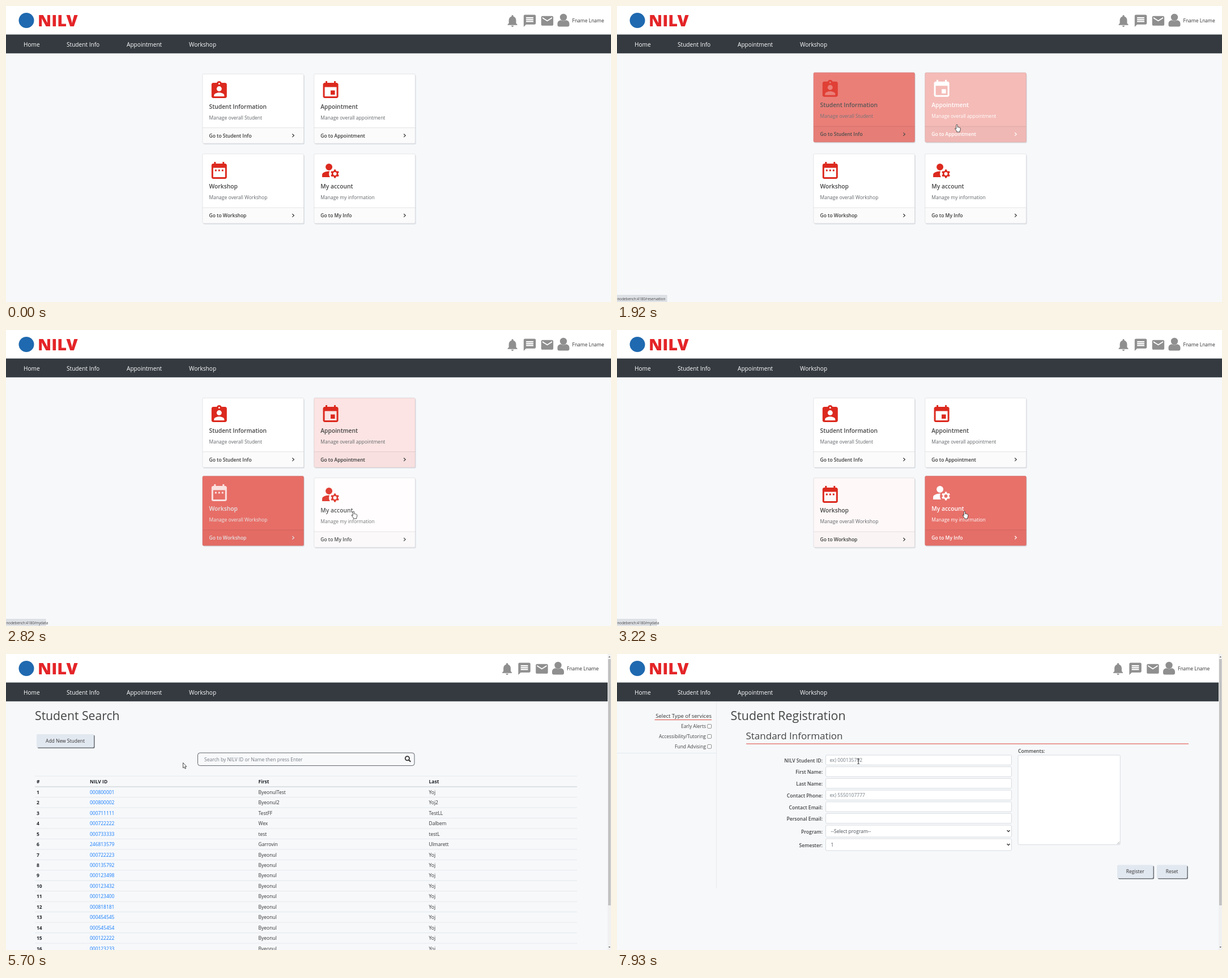
Recreate the animation shown at these times as an HTML page. Size 1068 by 524 pixels, loop 8 s.

```html
<!DOCTYPE html>
<html lang="en">
<head>
<meta charset="utf-8">
<title>Student portal</title>
<style>
html, body { margin: 0; width: 100%; height: 100%; overflow: hidden; background: #f6f8fa; }
svg { display: block; width: 100%; height: 100%; font-family: "Open Sans", "Noto Sans", sans-serif; }
</style>
</head>
<body>
<svg id="stage" viewBox="0 0 1068 524"></svg>
<script>
const LOOP = 8000, HOST = 'nodebench:4180/', WAIT = 'Waiting for data.quellumbsware.test...';
const RED = [220, 41, 30], WHITE = [255, 255, 255];

const ICON = {
  bell: 'M12 22c1.1 0 2-.9 2-2h-4c0 1.1.89 2 2 2zm6-6v-5c0-3.07-1.64-5.64-4.5-6.32V4c0-.83-.67-1.5-1.5-1.5s-1.5.67-1.5 1.5v.68C7.63 5.36 6 7.92 6 11v5l-2 2v1h16v-1l-2-2z',
  chat: 'M20 2H4c-1.1 0-2 .9-2 2v18l4-4h14c1.1 0 2-.9 2-2V4c0-1.1-.9-2-2-2zm-2 12H6v-2h12v2zm0-3H6V9h12v2zm0-3H6V6h12v2z',
  mail: 'M20 4H4c-1.1 0-2 .9-2 2v12c0 1.1.9 2 2 2h16c1.1 0 2-.9 2-2V6c0-1.1-.9-2-2-2zm0 4l-8 5-8-5V6l8 5 8-5v2z',
  badge: 'M19 3h-4.18C14.4 1.84 13.3 1 12 1s-2.4.84-2.82 2H5c-1.1 0-2 .9-2 2v14c0 1.1.9 2 2 2h14c1.1 0 2-.9 2-2V5c0-1.1-.9-2-2-2zm-7 0a1 1 0 0 1 0 2 1 1 0 0 1 0-2zm0 4a3 3 0 0 1 0 6 3 3 0 0 1 0-6zm6 12H6v-1.4c0-2 4-3.1 6-3.1s6 1.1 6 3.1V19z',
  event: 'M17 12h-5v5h5v-5zM16 1v2H8V1H6v2H5c-1.1 0-2 .9-2 2v14c0 1.1.9 2 2 2h14c1.1 0 2-.9 2-2V5c0-1.1-.9-2-2-2h-1V1h-2zm3 18H5V8h14v11z',
  dates: 'M9 11H7v2h2v-2zm4 0h-2v2h2v-2zm4 0h-2v2h2v-2zm2-7h-1V2h-2v2H8V2H6v2H5c-1.1 0-2 .9-2 2v14c0 1.1.9 2 2 2h14c1.1 0 2-.9 2-2V6c0-1.1-.9-2-2-2zm0 16H5V9h14v11z',
  account: 'M10 4a4 4 0 0 1 0 8 4 4 0 0 1 0-8zM10.67 13.02C10.45 13.01 10.23 13 10 13c-2.42 0-4.68.67-6.61 1.82C2.51 15.34 2 16.32 2 17.35V20h9.26C10.47 18.87 10 17.49 10 16c0-1.07.25-2.07.67-2.98zM20.75 16c0-.22-.03-.42-.06-.63l1.14-1.01-1-1.73-1.45.49c-.32-.27-.68-.48-1.08-.63L18 11h-2l-.3 1.49c-.4.15-.76.36-1.08.63l-1.45-.49-1 1.73 1.14 1.01c-.03.21-.06.41-.06.63s.03.42.06.63l-1.14 1.01 1 1.73 1.45-.49c.32.27.68.48 1.08.63L16 21h2l.3-1.49c.4-.15.76-.36 1.08-.63l1.45.49 1-1.73-1.14-1.01c.03-.21.06-.41.06-.63zM17 18a2 2 0 0 1 0-4 2 2 0 0 1 0 4z'
};

// Markup helpers
const text = (x, y, s, size = 8.5, fill = '#333', weight = 400, anchor = 'start') =>
  `<text x="${x}" y="${y}" font-size="${size}" fill="${fill}" font-weight="${weight}" text-anchor="${anchor}">${s}</text>`;
const rect = (x, y, w, h, fill, extra = '') =>
  `<rect x="${x}" y="${y}" width="${w}" height="${h}" fill="${fill}" ${extra}/>`;
const path = (d, extra = '') => `<path d="${d}" ${extra}/>`;
const line = (x1, y1, x2, y2, color, w = .7) =>
  `<line x1="${x1}" y1="${y1}" x2="${x2}" y2="${y2}" stroke="${color}" stroke-width="${w}"/>`;
const icon = (name, x, y, scale, extra = '') =>
  path(ICON[name], `transform="translate(${x} ${y}) scale(${scale})" fill-rule="evenodd" ${extra}`);
const group = (id, body) => `<g id="${id}">${body}</g>`;
const button = (id, x, y, w, h, label) => group(id,
  rect(x + 1.6, y + 1.6, w, h, '#6d7278', 'rx="2"') + rect(x, y, w, h, '#e2e8f0', 'rx="2"') +
  text(x + w / 2, y + h / 2 + 3, label, 8.5, '#333', 400, 'middle'));
const chevron = (x, y, extra = '') =>
  path(`M${x - 1.6} ${y - 2.8}l3 2.8-3 2.8`, `fill="none" stroke-width="1.2" ${extra}`);

const header = () => rect(0, 0, 1068, 50.5, '#fff') +
  '<circle cx="36" cy="25.5" r="13.5" fill="#1f69b0"/>' + text(56, 36, 'NILV', 29, '#e42528', 800) +
  group('tools', `<g fill="#8f8f8f">${icon('bell', 881.2, 13.4, 1.07)}${icon('chat', 911.7, 13.4, 1.07)}` +
    icon('mail', 942.6, 13.4, 1.07) + '<circle cx="984" cy="20" r="6.2"/>' +
    path('M973.5 33.5v-2c0-4 3-6.2 6-6.2q4.500 2.200 9 0c3 0 6 2.200 6 6.200v2q0 3-3 3h-15q-3 0-3-3z') + '</g>' +
    text(999.5, 28.7, 'Fname Lname')) +
  rect(0, 50.5, 1068, 33.3, '#343a40') +
  [[31, 'Home'], [107, 'Student Info'], [213, 'Appointment'], [323, 'Workshop']]
    .map(([x, s]) => text(x, 71.6, s, 10.15, '#fff')).join('');

const CARDS = [
  ['badge', 'Student Information', 'Manage overall Student', 'Go to Student Info'],
  ['event', 'Appointment', 'Manage overall appointment', 'Go to Appointment'],
  ['dates', 'Workshop', 'Manage overall Workshop', 'Go to Workshop'],
  ['account', 'My account', 'Manage my information', 'Go to My Info']
];
const card = ([name, title, note, link], i) => group('card' + i,
  rect(1.3, 1.6, 178.6, 123.2, '#dcdfe4', 'rx="2"') +
  rect(0, 0, 178.5, 123, '#fff', 'class="face" rx="2" stroke="#dcdcdf" stroke-width=".7"') +
  rect(.3, 95.2, 178, 27.5, '#000', 'opacity=".015"') + line(0, 95.2, 178.5, 95.2, 'rgba(0,0,0,.14)') +
  icon(name, 11.3, 11.3, 1.5, 'class="icon"') +
  text(11.5, 61.4, title, 10.3, '#444', 600) + text(11.5, 80.4, note, 8.5, '#606468') +
  text(11.5, 112.3, link, 8.5, '#383838', 600) + chevron(160, 109, 'class="chev"'));

const ROWS = ['000800001 ByeonulTest Yoj', '000800002 Byeonul2 Yoj2', '000711111 TestFF TestLL',
  '000722222 Wex Dalbem', '000733333 test testL', '246813579 Garrovin Ulmarett',
  ...['000722223', '000135792', '000123498', '000123432', '000123400', '000818181',
    '000454545', '000545454', '000122222', '000123233'].map(id => id + ' Byeonul Yoj')];
const row = (s, i) => {
  const [id, first, last] = s.split(' '), y = 247.7 + i * 18.47;
  return text(54, y, i + 1, 8.5, '#212529', 700) + text(148, y, id, 8.45, '#147bfc') +
    text(445.5, y, first) + text(746.5, y, last) + line(51, y + 5.8, 1008, y + 5.8, '#dee2e6');
};
const search = () => text(51, 117, 'Student Search', 21.2, '#444', 500) +
  button('add', 54, 142, 101, 23.5, 'Add New Student') +
  group('find', rect(338.5, 175, 382.5, 22.6, '#f8f9fb', 'rx="4" stroke="#50555b" stroke-width=".9"') +
    text(350, 189.6, 'Search by NILV ID or Name then press Enter', 8.5, '#757b82') +
    '<circle cx="708.400" cy="184.800" r="3.600" fill="none" stroke="#333" stroke-width="1.800"/>' +
    line(711, 187.5, 714.3, 190.8, '#333', 2)) +
  group('table', line(51, 216.2, 1008, 216.2, '#dee2e6') + line(51, 235, 1008, 235, '#d5dade', 1.3) +
    text(54, 228.8, '#', 8.5, '#212529', 700) + text(148, 228.8, 'NILV ID', 8.5, '#212529', 700) +
    text(445.5, 228.8, 'First', 8.5, '#212529', 700) + text(746.5, 228.8, 'Last', 8.5, '#212529', 700) +
    ROWS.map(row).join(''));

const field = ([label, y, h, value, select]) =>
  text(363, y + h / 2 + 4.1, label, 8.6, '#444', 600, 'end') +
  rect(368.5, y, 328, h, '#fff', 'rx="2" stroke="#ced4da" stroke-width=".8"') +
  text(select ? 377.5 : 375.5, y + h / 2 + 3, value, 8.5, select ? '#495057' : '#757d85') +
  (select ? path(`M688.500 ${y + h / 2 - 1.5}l2.500 2.500 2.500-2.500`, 'fill="none" stroke="#333" stroke-width="1.300"') : '');
const FIELDS = [
  ['NILV Student ID:', 179, 17.4, 'ex) 000135792'], ['First Name:', 199.6, 17.4, ''],
  ['Last Name:', 220.3, 17.4, ''], ['Contact Phone:', 241, 17.4, 'ex) 5550107777'],
  ['Contact Email:', 261.7, 17.4, ''], ['Personal Email:', 282.3, 17.4, ''],
  ['Program:', 303, 21, '--Select program--', 1], ['Semester:', 327, 21, '1', 1]
];
const form = () => text(167, 113, 'Select Type of services', 9.5, '#333', 500, 'end') +
  line(66.5, 116.5, 167, 116.5, '#e0463c', 1) +
  ['Early Alerts', 'Accessibility/Tutoring', 'Fund Advising'].map((s, i) =>
    text(157, 131.2 + i * 17.9, s, 8.45, '#444', 400, 'end') +
    rect(159.8, 124.6 + i * 17.9, 6.8, 6.8, '#fff', 'rx="1" stroke="#707070" stroke-width=".8"')).join('') +
  line(0, 175.5, 175.5, 175.5, '#e1e4e8') + line(175.5, 84, 175.5, 415, '#e1e4e8') +
  text(200.5, 117, 'Student Registration', 21.4, '#444', 500) +
  text(227.5, 150.8, 'Standard Information', 17, '#444', 500) + line(228, 159, 1009, 159, '#e0463c', 1.1) +
  FIELDS.map(field).join('') + text(708, 175, 'Comments:', 8.6, '#444', 600) +
  rect(708, 179, 180.3, 158.6, '#fff', 'rx="2" stroke="#ced4da" stroke-width=".8"') +
  path('M883 336.500l4-4M885.500 336.500l1.500-1.500', 'stroke="#777" stroke-width=".700"') +
  button('register', 883, 373.5, 63.5, 23.5, 'Register') + button('reset', 953, 373.5, 53.3, 23.5, 'Reset');

const scrollbar = () => rect(1062, 0, 6, 524, '#f1f1f1') + rect(1063, 9, 4.6, 436, '#c1c1c1') +
  path('M1063.500 6h3.400l-1.700-2zM1063.500 518h3.400l-1.700 2z', 'fill="#505050"');

const pointers = () =>
  path('M0 0v9.300l2.100-1.900 1.400 3.200 1.500-.6-1.400-3.200h2.700z',
    'id="arrow" fill="#fff" stroke="#222" stroke-width=".8"') +
  path('M0 0q1.200 0 1.200 1.200v3.300q1.300-.6 1.900.3 1.200-.4 1.700.5 1.400-.1 1.400 1.300v2q0 1.600-1 2.800v1.600h-5.400v-1.400l-3-3.900q-.6-1.300.6-1.400l1.400 1.300v-6.400q0-1.200 1.200-1.200z',
    'id="hand" fill="#fff" stroke="#222" stroke-width=".8"') +
  path('M-1.800-4.500q1.800 0 1.800 1 0-1 1.800-1M0-4v8M-1.800 4.500q1.800 0 1.800-1 0 1 1.800 1',
    'id="beam" fill="none" stroke="#222" stroke-width=".9"');

const stage = document.getElementById('stage');
stage.innerHTML = rect(0, 0, 1068, 524, '#f6f8fa') + header() +
  group('home', CARDS.map(card).join('')) + group('search', search()) + group('form', form()) +
  group('scroll', scrollbar()) +
  group('status', rect(-1, 512, 0, 13, '#dee1e6', 'stroke="#c9ccd1" stroke-width=".6"') + text(.5, 520.6, '', 6.3, '#444')) +
  group('pointer', pointers());
const $ = id => document.getElementById(id);
const show = (id, on) => $(id).setAttribute('display', on ? 'inline' : 'none');

// Timeline: hover = [card, enter, leave]; status = [time, text, width]; pointer = [time, x, y, shape]
const HOVERS = [[3, 560, 680], [2, 790, 890], [0, 900, 1800], [1, 1685, 2455], [2, 2360, 2785], [3, 2790, 4105], [0, 4008, 9000]];
const STATUS = [[0, ''], [920, HOST + 'studentinfo', 84], [1820, HOST + 'reservation', 88], [2420, HOST + 'workshop', 80],
  [2820, HOST + 'mydata', 70], [4120, HOST + 'studentinfo', 84], [4220, WAIT, 355], [4560, ''],
  [6430, HOST + 'addstudent', 86], [6630, WAIT, 385], [7830, '']];
const POINTER = [[20, 1038, 508, 'arrow'], [520, 668, 345, 'hand'], [820, 446, 248, 'hand'], [920, 430, 222, 'hand'],
  [1620, 505, 204, 'hand'], [1920, 600, 210, 'hand'], [2320, 570, 228, 'hand'], [2420, 490, 292, 'hand'],
  [2720, 510, 322, 'hand'], [2820, 613.5, 321, 'hand'], [3920, 613.5, 321, 'hand'], [4120, 440.5, 193, 'hand'],
  [4420, 440.5, 193, 'arrow'], [5180, 350, 202, 'arrow'], [5630, 312.5, 192.5, 'arrow'], [5980, 184, 215, 'arrow'],
  [6380, 107, 153, 'hand'], [6830, 107, 153, 'hand'], [6930, 107, 153, 'arrow'], [7730, 395, 186, 'beam'], [7930, 426.2, 190, 'beam']];

const ease = v => { v = Math.min(1, Math.max(0, v)); return v * v * (3 - 2 * v); };
const mix = (a, b, p) => `rgb(${a.map((v, i) => Math.round(v + (b[i] - v) * p))})`;
const last = (list, t) => list.filter(k => k[0] <= t).pop();
const hover = (i, t, dur) => HOVERS.reduce((v, [c, on, off]) =>
  c === i ? Math.max(v, ease((t - on) / dur) * (1 - ease((t - off) / dur))) : v, 0);

const parts = CARDS.map((_, i) => ({
  root: $('card' + i), face: $('card' + i).querySelector('.face'),
  icon: $('card' + i).querySelector('.icon'), chev: $('card' + i).querySelector('.chev'),
  texts: [...$('card' + i).querySelectorAll('text')]
}));
const INK = [[68, 68, 68], [96, 100, 104], [56, 56, 56]];

function drawCards(t) {
  parts.forEach((p, i) => {
    const glow = hover(i, t, 500) * .7, ink = hover(i, t, 150), lift = hover(i, t, 370) * 3.2;
    p.root.setAttribute('transform', `translate(${i % 2 ? 543.8 : 347} ${(i > 1 ? 261.8 : 120.3) - lift})`);
    p.face.setAttribute('fill', mix(WHITE, RED, glow));
    p.face.setAttribute('stroke', mix([220, 220, 223], [200, 70, 62], glow));
    p.icon.setAttribute('fill', mix(RED, WHITE, ink));
    p.chev.setAttribute('stroke', mix(INK[2], WHITE, ink));
    p.texts.forEach((el, k) => el.setAttribute('fill', mix(INK[k], WHITE, ink)));
  });
}

function drawPointer(t) {
  const a = last(POINTER, t);
  show('pointer', a);
  if (!a) return;
  const b = POINTER[POINTER.indexOf(a) + 1] || a;
  const p = b === a ? 0 : (t - a[0]) / (b[0] - a[0]);
  $('pointer').setAttribute('transform', `translate(${a[1] + (b[1] - a[1]) * p} ${a[2] + (b[2] - a[2]) * p})`);
  ['arrow', 'hand', 'beam'].forEach(s => show(s, s === a[3]));
}

function drawStatus(t) {
  const [, label, width] = last(STATUS, t) || STATUS[0], [box, words] = $('status').children;
  show('status', label);
  if (!label) return;
  box.setAttribute('width', width + 1);
  words.textContent = label;
}

function draw(now) {
  const ms = now % LOOP, shift = ms < 4460 ? 20 : 30;
  const t = Math.floor((ms - shift) / 100) * 100 + shift;
  const page = t < 4420 ? 'home' : t < 6930 ? 'search' : 'form', scrolled = ms >= 4460;
  ['home', 'search', 'form'].forEach(id => show(id, id === page));
  show('scroll', scrolled);
  show('table', scrolled);
  $('tools').setAttribute('transform', `translate(${scrolled ? -9.5 : 0})`);
  $('find').setAttribute('transform', `translate(${scrolled ? 0 : 4})`);
  $('add').setAttribute('transform', `translate(0 ${-2 * ease((t - 6300) / 150)})`);
  drawCards(t);
  drawStatus(t);
  drawPointer(t);
}

const start = performance.now();
const tick = () => { draw(performance.now() - start); requestAnimationFrame(tick); };
tick();
</script>
</body>
</html>
```
